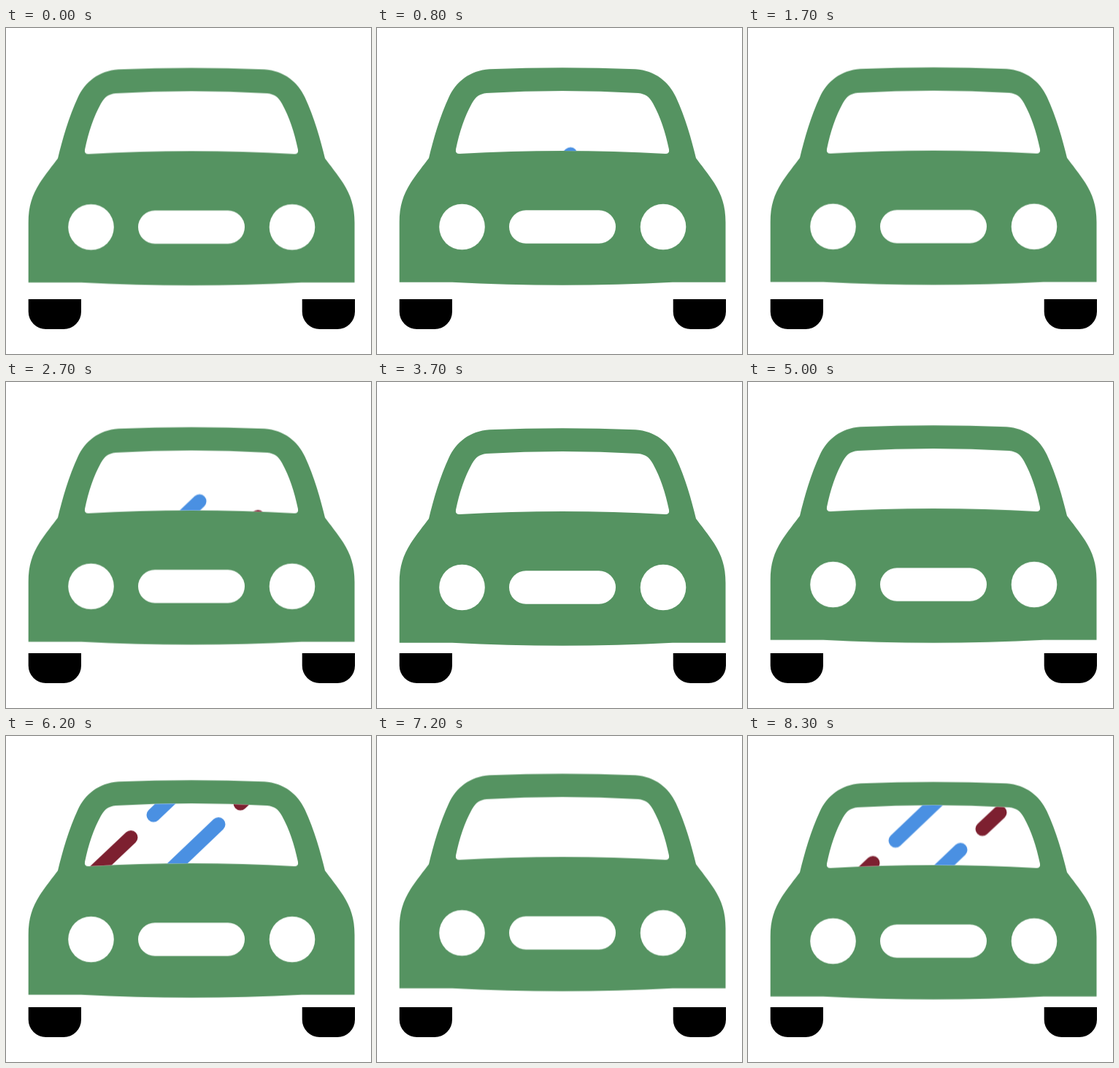
Animation, 500 px wide and 446 px high, one loop 8400 ms. Source, as an HTML page:

```html
<!DOCTYPE html>
<html lang="en">
<head>
<meta charset="utf-8">
<title>Bouncing car</title>
<style>
  html, body { margin: 0; width: 100%; height: 100%; overflow: hidden; background: #fff; }
  svg { display: block; width: 100%; height: 100%; }
  .streaks { fill: none; stroke-width: 19; stroke-linecap: round; }
  .red { stroke: #7d2030; }
  .blue { stroke: #4a90e2; }
</style>
</head>
<body>
<svg viewBox="0 0 500 446">
  <defs>
    <path id="window" d="M108 167C113 143 120 122 130 104C136 94 140 91.500 150 90Q254 84 358 90C368 91.500 372 94 378 104C388 122 395 143 400 167Q401 173 395 173Q254 165 113 173Q107 173 108 167Z"/>
    <clipPath id="glass"><use href="#window"/></clipPath>
    <path id="wheel" d="M30.700 371H103V388A24 24 0 0 1 79 412H54.700A24 24 0 0 1 30.700 388Z"/>
  </defs>
  <use href="#wheel"/>
  <use href="#wheel" x="375"/>
  <g id="body">
    <path fill="#559361" d="M30.700 348.700V267C30.700 244 36 229 46 213C53 202 65 187 71 179C77 154 86 122 98.500 95.500C108 75 127 59 154 57.300Q254 53 354 57.300C381 59 400 75 409.500 95.500C422 122 431 154 437 179C443 187 455 202 462 213C472 229 477.500 244 477.500 267V348.700H405Q254 356.700 103 348.700Z"/>
    <g fill="#fff">
      <use href="#window"/>
      <circle cx="116.500" cy="273" r="31.300"/>
      <circle cx="392" cy="273" r="31.300"/>
      <rect x="181" y="250.300" width="146" height="45.400" rx="23"/>
    </g>
    <g clip-path="url(#glass)">
      <g id="streaks" class="streaks">
        <path class="red" d="M171 133.500l-53 50M321 87l24 -22.500"/>
        <path class="blue" d="M202 103l63 -60M291 115.500l-63 60"/>
      </g>
    </g>
  </g>
</svg>
<script>
  const LOOP = 8400, STEP = 100;
  const BOUNCE = 793, BOUNCE_START = 65;
  const SWEEP = 1983, SWEEP_MID = 251, SWEEP_RISE = 112;

  const bounce = t => 12.1 * Math.abs(Math.sin(Math.PI * (t - BOUNCE_START) / BOUNCE)) - 3.7;

  // Streaks drop in quickly from above the glass and slow down on the way out.
  const sweep = t => SWEEP_RISE * (((t % SWEEP) / SWEEP_MID) ** (2 / 3) - 1);

  // Held poses, one every STEP milliseconds.
  function play(id, offsetAt) {
    const frames = [];
    for (let t = 0; t <= LOOP; t += STEP) {
      frames.push({
        offset: t / LOOP,
        transform: `translateY(${offsetAt(t).toFixed(2)}px)`,
        easing: 'step-end'
      });
    }
    const animation = document.getElementById(id).animate(frames, { duration: LOOP, iterations: Infinity });
    animation.startTime = document.timeline.currentTime;
  }

  play('body', bounce);
  play('streaks', sweep);
</script>
</body>
</html>
```
